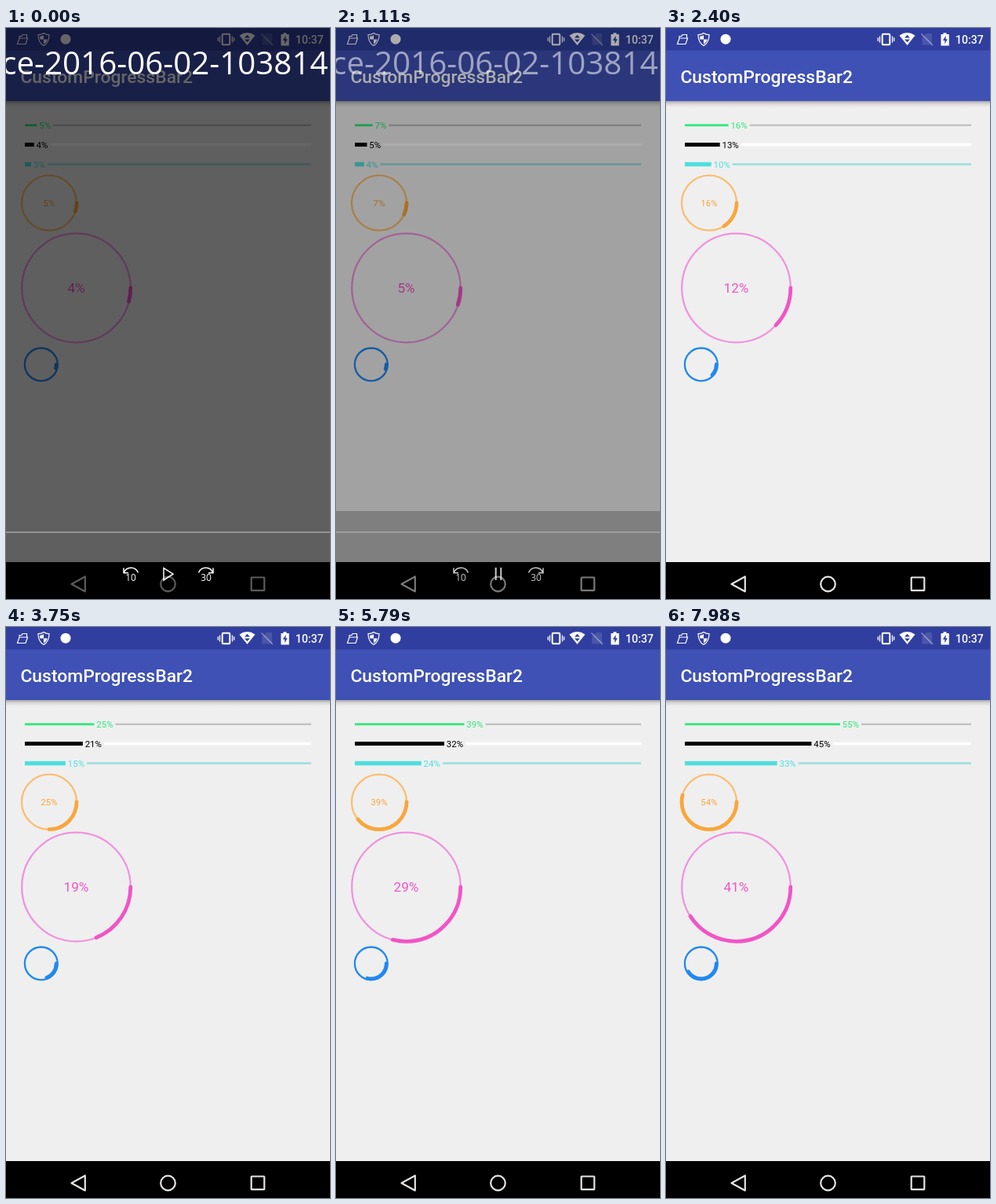
Animation, 413 px wide and 727 px high, one loop 8000 ms. Source, as an HTML page:

```html
<!DOCTYPE html>
<html lang="en">
<head>
<meta charset="utf-8">
<title>Progress bars</title>
<style>
  html, body { margin: 0; width: 100%; height: 100%; overflow: hidden; background: #000; }
  svg { display: block; width: 100%; height: 100%; }
  text { font-family: Roboto, "Noto Sans", sans-serif; }
  .title { font-size: 22.9px; font-weight: 500; fill: #fff; }
  .clock { font-size: 14.1px; font-weight: 500; fill: #fff; }
  .label { font-size: 11.47px; }
  .mid { text-anchor: middle; }
  .player { font-family: "Open Sans", "Noto Sans", sans-serif; fill: #fff; }
  .line { fill: none; stroke: #fff; }
</style>
</head>
<body>
<svg id="stage" viewBox="0 0 413 727" preserveAspectRatio="none">
  <defs>
    <linearGradient id="shade" x2="0" y2="1">
      <stop offset="0" stop-color="#000" stop-opacity=".3"/>
      <stop offset=".45" stop-color="#000" stop-opacity=".1"/>
      <stop offset="1" stop-color="#000" stop-opacity="0"/>
    </linearGradient>
  </defs>

  <rect width="413" height="727" fill="#efefef"/>
  <rect y="93" width="413" height="8" fill="url(#shade)"/>
  <rect width="413" height="93" fill="#3f51b5"/>
  <rect width="413" height="28.5" fill="#303f9f"/>
  <text class="title" x="18.4" y="70">CustomProgressBar2</text>

  <!-- status bar -->
  <g class="line" stroke-width="1.2">
    <path d="M14.5 20.5L17 13H27.5L25 20.5ZM17 13V10.5H20L21 8.5H26.5V13"/>
    <path d="M48 6.5C46 8 43.5 8.7 41 8.7C41 15 43 19.5 48 22.5C53 19.5 55 15 55 8.7C52.500 8.700 50 8 48 6.500Z"/>
  </g>
  <path d="M48 9C46.500 10 45 10.500 43 10.700L43.300 14.500H48ZM48 14.500H52.700C52 17 50.500 19 48 20.500Z" fill="#fff"/>
  <circle cx="76" cy="14.200" r="6.500" fill="#fff"/>
  <rect class="line" x="275.700" y="7.700" width="9.600" height="13.600" rx="1" stroke-width="2"/>
  <path class="line" d="M272.500 10.500V18.500M270.300 12.200V16.800M288.500 10.500V18.500M290.700 12.200V16.800" stroke-width="1.300"/>
  <path d="M297.500 9.500Q307.500 2.700 317.500 9.500L307.500 22Z" fill="#fff"/>
  <path d="M304 12.500L307.500 8.700L311 12.500ZM304 14.500H311L307.500 18.300Z" fill="#303f9f"/>
  <path d="M326.500 21.500V12.500L332 7H339V21.500Z" fill="#4a57a9"/>
  <path class="line" d="M325.500 7.500L340 22" stroke-width="1.300" opacity=".45"/>
  <path d="M350.500 8H353.500V6.300H357.500V8H360.800V22.500H350.500Z" fill="#fff"/>
  <path d="M356.800 9.800L352.800 15.800H355.300V20.300L358.900 14.300H356.500Z" fill="#303f9f"/>
  <text class="clock" x="369" y="20">10:37</text>

  <g id="bars"></g>
  <g id="rings"></g>

  <!-- navigation bar -->
  <rect y="680" width="413" height="47" fill="#000"/>
  <g fill="none" stroke="#e4e4e4" stroke-width="2.200">
    <path d="M100.800 698.500V717.500L83.500 708Z" stroke-linejoin="round"/>
    <circle cx="206.500" cy="708" r="9.300"/>
    <rect x="312.700" y="699.500" width="16.600" height="16.600" rx=".5"/>
  </g>

  <!-- video player overlay -->
  <rect id="dim" width="413" height="615"/>
  <rect id="band" y="615" width="413" height="112"/>
  <text id="clip" class="player" x="410.500" y="59" font-size="40.300" text-anchor="end">device-2016-06-02-103814</text>
  <g id="controls">
    <rect y="641" width="413" height="2" fill="#fff" opacity=".32"/>
    <g class="line" stroke-width="1.500">
      <path d="M150.500 693.500C153 685.500 165 685 168.500 693.500M150 687.500V693.700H156"/>
      <path d="M263.500 693.500C261 685.500 249 685 245.500 693.500M264 687.500V693.700H258"/>
      <path id="play" d="M201 687.500V703L213 695.200Z"/>
      <path id="pause" d="M203.700 687V703M210.300 687V703" stroke-width="2"/>
    </g>
    <g class="player mid" font-size="12">
      <text class="player" x="159" y="704">10</text>
      <text class="player" x="255" y="704">30</text>
    </g>
  </g>
</svg>
<script>
const LOOP = 8000, LEFT = 24, WIDTH = 365, GAP = 2.8;
const times = [840, 1110, 1410, 2400, 3750, 5790, 7980];
const counts = {
  green:  [5.4, 7.2, 8.9, 16.1, 25.6, 39.9, 55.3],
  black:  [4.4, 5.9, 7.7, 13.4, 21.2, 32.9, 45.4],
  cyan:   [3.7, 4.8, 5.9, 10.1, 15.6, 24.1, 33.1],
  orange: [5.6, 7.3, 8.9, 16.3, 25.5, 39.4, 54.3],
  pink:   [4.1, 5.4, 6.9, 12.1, 19.1, 29.7, 41.1]
};
const barSpecs = [
  { count: 'green', y: 123.8, full: 2.8, rest: 2.4, color: '#30e87c', track: '#c1c1c1' },
  { count: 'black', y: 148.5, full: 5, rest: 3.6, color: '#000', track: '#fff' },
  { count: 'cyan', y: 173.5, full: 5.4, rest: 3, color: '#4ddfdd', track: '#a6e1e0' }
];
const ringSpecs = [
  { count: 'orange', x: 55, y: 222.7, r: 35, arc: 35, color: '#f9a63c', track: '#f9be6f', size: 11.47 },
  { count: 'pink', x: 89.5, y: 331, r: 69.3, arc: 69.3, color: '#f254c6', track: '#f093de', size: 17.2 },
  { count: 'pink', x: 44.8, y: 428.4, r: 20.9, arc: 19.4, color: '#2189ee', track: '#2189ee' }
];

const byId = id => document.getElementById(id);
const [dim, band, clip, controls, play, pause] =
  ['dim', 'band', 'clip', 'controls', 'play', 'pause'].map(byId);

function add(parent, tag, attrs) {
  const el = document.createElementNS('http://www.w3.org/2000/svg', tag);
  for (const key in attrs) el.setAttribute(key, attrs[key]);
  return parent.appendChild(el);
}

const bars = barSpecs.map(s => {
  const g = byId('bars');
  const strip = (h, fill) => add(g, 'rect', { x: LEFT, y: s.y - h / 2, height: h, fill });
  return {
    count: s.count,
    rest: strip(s.rest, s.track),
    done: strip(s.full, s.color),
    label: add(g, 'text', { class: 'label', y: s.y + 4.1, fill: s.color })
  };
});

const rings = ringSpecs.map(s => {
  const g = byId('rings'), at = { cx: s.x, cy: s.y, fill: 'none' };
  add(g, 'circle', { ...at, r: s.r, stroke: s.track, 'stroke-width': 2.3 });
  return {
    count: s.count,
    arc: add(g, 'circle', {
      ...at, r: s.arc, stroke: s.color, 'stroke-width': 4.8,
      'stroke-linecap': 'round', pathLength: 100
    }),
    label: s.size && add(g, 'text', {
      class: 'mid', x: s.x, y: s.y + s.size * .355, 'font-size': s.size, fill: s.color
    })
  };
});

function valueAt(name, t) {
  const row = counts[name];
  if (t <= times[0]) return Math.floor(row[0]);
  let i = 1;
  while (i < times.length - 1 && t > times[i]) i++;
  const k = (t - times[i - 1]) / (times[i] - times[i - 1]);
  return Math.floor(row[i - 1] + k * (row[i] - row[i - 1]));
}

const fade = (t, from, to) => Math.min(1, Math.max(0, (to - t) / (to - from)));

function draw(t) {
  for (const b of bars) {
    const v = valueAt(b.count, t);
    const x = LEFT + WIDTH * v / 100;
    const start = x + (v < 10 ? 14.9 : 21.4) + GAP;
    b.done.setAttribute('width', x - GAP - LEFT);
    b.label.setAttribute('x', x);
    b.label.textContent = v + '%';
    b.rest.setAttribute('x', start);
    b.rest.setAttribute('width', LEFT + WIDTH - start);
  }
  for (const r of rings) {
    const v = valueAt(r.count, t);
    r.arc.setAttribute('stroke-dasharray', v + ' 200');
    if (r.label) r.label.textContent = v + '%';
  }
  const top = fade(t, 830, 1445), bottom = fade(t, 970, 1620);
  dim.setAttribute('opacity', .6 * top);
  band.setAttribute('opacity', .6 * bottom);
  clip.setAttribute('opacity', top);
  controls.setAttribute('opacity', bottom);
  play.setAttribute('visibility', t < 660 ? 'visible' : 'hidden');
  pause.setAttribute('visibility', t < 660 ? 'hidden' : 'visible');
}

const begin = performance.now();
function tick() {
  draw((performance.now() - begin) % LOOP);
  requestAnimationFrame(tick);
}
tick();
</script>
</body>
</html>
```
